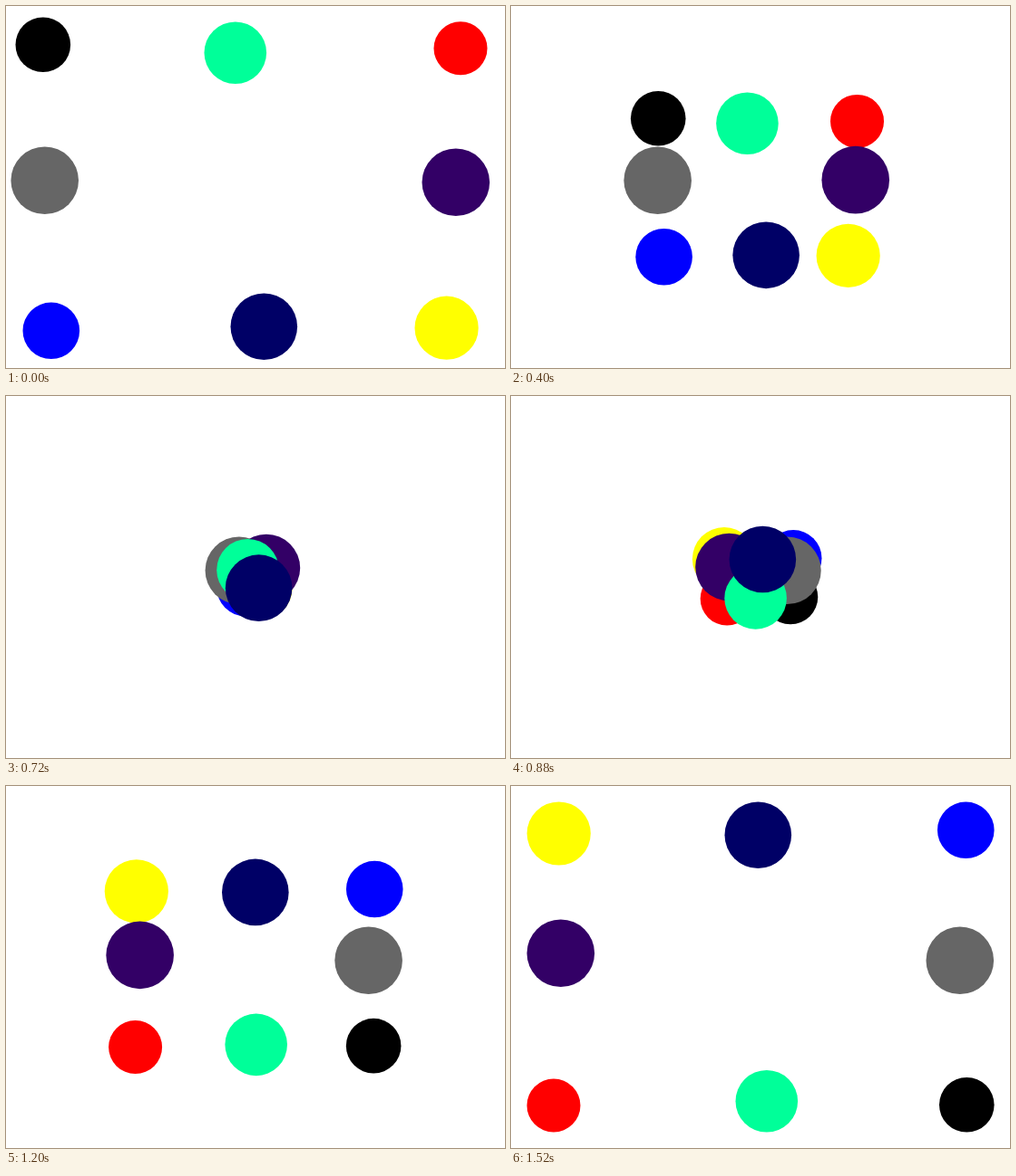
An HTML page with a canvas for the animation above (1600 ms loop, 550 px wide and 400 px high).

```html
<!DOCTYPE html>
<html lang="en">
<head>
<meta charset="utf-8">
<title>Crossing circles</title>
<style>
  html, body { margin: 0; width: 100%; height: 100%; overflow: hidden; background: #fff; }
  canvas { display: block; }
</style>
</head>
<body>
<canvas id="stage" width="550" height="400"></canvas>
<script>
const ctx = document.getElementById('stage').getContext('2d');
const STEP = 80, STEPS = 20;

// Back to front: colour, radius, start x, y, end x, y
const circles = [
  ['#000', 30.3, 40.8, 42.8, 502.3, 352.3],
  ['#f00', 29.5, 501, 46.8, 47, 353],
  ['#00f', 31.3, 49.8, 358.8, 501.3, 48.8],
  ['#ff0', 35.1, 485.6, 355.7, 52.7, 52.5],
  ['#666', 37.3, 42.7, 192.8, 494.8, 192.8],
  ['#306', 37.3, 495.8, 194.8, 54.8, 184.8],
  ['#0f9', 34.3, 252.8, 51.7, 281.8, 348.3],
  ['#006', 36.8, 284.3, 354.3, 272.3, 54.2],
];

const lerp = (a, b, t) => a + (b - a) * t;

function draw() {
  const t = Math.floor(performance.now() / STEP) % STEPS / (STEPS - 1);
  ctx.clearRect(0, 0, 550, 400);
  for (const [color, r, x0, y0, x1, y1] of circles) {
    ctx.fillStyle = color;
    ctx.beginPath();
    ctx.arc(lerp(x0, x1, t), lerp(y0, y1, t), r, 0, Math.PI * 2);
    ctx.fill();
  }
  requestAnimationFrame(draw);
}
draw();
</script>
</body>
</html>
```
